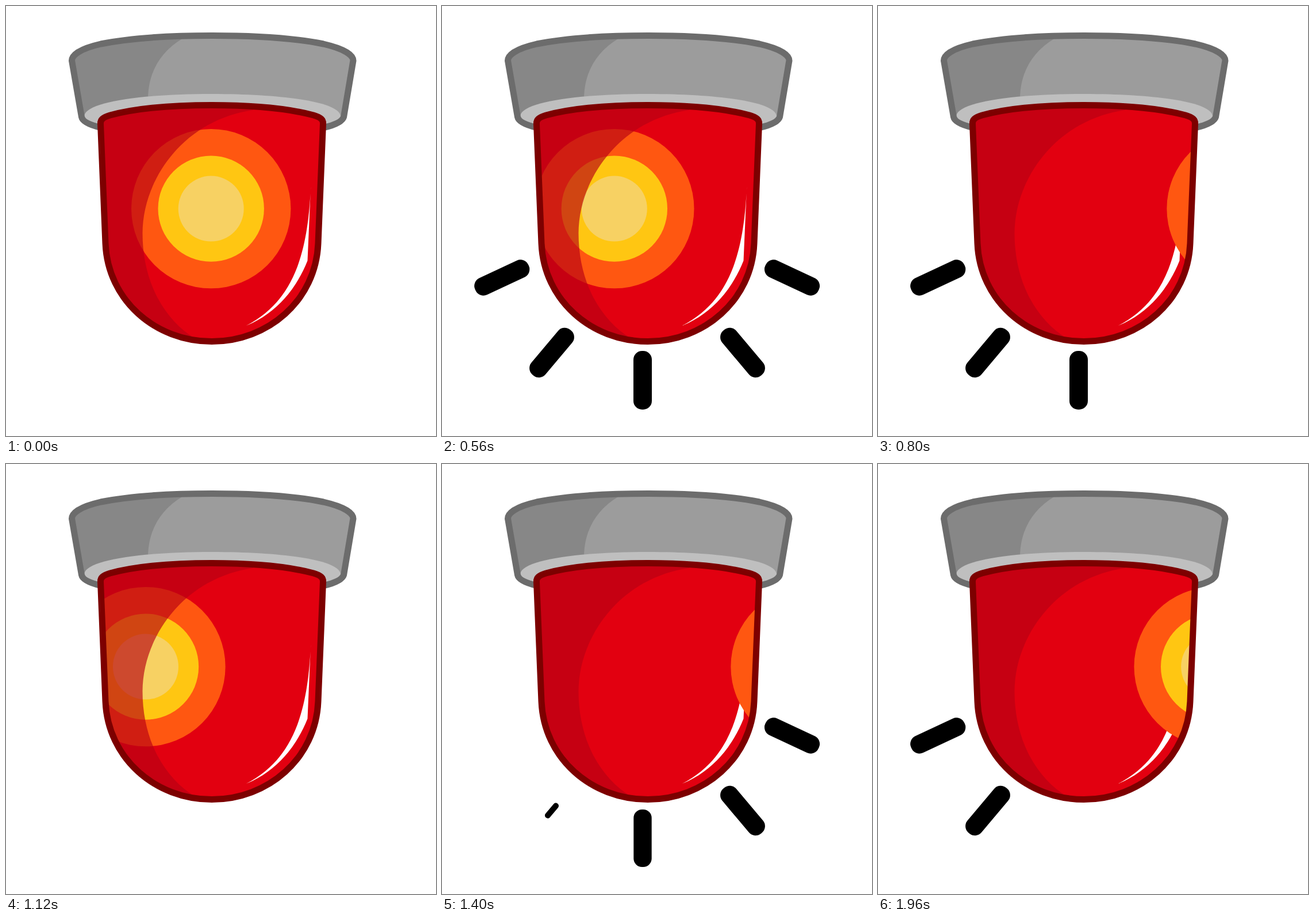
Recreate the animation shown at these times as an HTML page. Size 748 px wide and 748 px high, loop 2000 ms.

```html
<!DOCTYPE html>
<html lang="en">
<head>
<meta charset="utf-8">
<title>Warning lamp</title>
<style>
  html, body { margin: 0; width: 100%; height: 100%; overflow: hidden; background: #fff; }
  svg { display: block; width: 100vw; height: 100vh; }
</style>
</head>
<body>
<svg viewBox="0 0 748 748">
  <defs>
    <path id="mount" d="M114.5 95C114.5 85 130 74 165 66C220 55 290 51.5 358.5 51.5C427 51.5 497 55 552 66C587 74 604 85 604 95L587.5 193C585 201 572 207 553 211.5L165 211.5C146 207 133 201 131.5 193Z"/>
    <path id="bulb" d="M164.5 205C164 198 168 194 181 190C226 178 290 172.5 358 172.5C426 172.5 490 178 535 190C548 194 552 198 551.5 205L543 413C539 512 456 583.5 358 583.5C260 583.5 177 512 173 413Z"/>
    <clipPath id="inMount"><use href="#mount"/></clipPath>
    <clipPath id="inBulb"><use href="#bulb"/></clipPath>
  </defs>

  <g clip-path="url(#inMount)">
    <rect x="100" y="40" width="520" height="180" fill="#9c9c9c"/>
    <path d="M308 56C268 80 248 115 247 160V220H100V40H308Z" fill="#878787"/>
    <path d="M136 191C140 166 240 153 358 153C478 153 578 166 582 191V220H136Z" fill="#bfbfbf"/>
  </g>
  <use href="#mount" fill="none" stroke="#6c6c6c" stroke-width="11" stroke-linejoin="round"/>

  <g clip-path="url(#inBulb)">
    <rect x="150" y="160" width="420" height="440" fill="#e20010"/>
    <path d="M530.5 306L524.5 443C505 492 470 535 418 556C496 515 526 440 530.5 306Z" fill="#fff"/>
    <g id="glow">
      <circle r="138.7" fill="#ff5711"/>
      <circle r="92.2" fill="#ffc612"/>
      <circle r="57" fill="#f7d163"/>
    </g>
    <path d="M430 181C310 198 238 300 237.5 395C237.5 480 275 545 328 578V600H150V160H430Z" fill="#b70013" fill-opacity=".65"/>
  </g>
  <use href="#bulb" fill="none" stroke="#7d0000" stroke-width="11" stroke-linejoin="round"/>
  <g id="rays"></g>
</svg>
<script>
  const STEP = 40, STEPS = 50;
  const GLOW_CYCLE = 15, RAY_CYCLE = 26;
  const GROW = [0, 0.31, 0.91, 0.98, 1];
  // x, y, angle; in the order they light up
  const RAYS = [
    [609, 472.5, -65],
    [523, 603, -40],
    [349, 651, 0],
    [191, 603, 40],
    [104.3, 472.5, 65]
  ];

  const glow = document.getElementById("glow");
  const holder = document.getElementById("rays");

  const rays = RAYS.map(() => {
    const bar = document.createElementNS("http://www.w3.org/2000/svg", "rect");
    const size = { x: -16, y: -51, width: 32, height: 102, rx: 15 };
    for (const key in size) bar.setAttribute(key, size[key]);
    holder.append(bar);
    return bar;
  });

  function rayScale(step, i) {
    const age = step % RAY_CYCLE - 2 - 2 * i;
    if (age <= 0 || age >= 16) return 0;
    return GROW[Math.min(age, GROW.length - 1)];
  }

  function draw(step) {
    // leaves on the right, re-enters on the left
    const shift = (step + 8) % GLOW_CYCLE - 8;
    glow.setAttribute("transform", `translate(${356.7 + 56.87 * shift} 352.6)`);

    rays.forEach((bar, i) => {
      const [x, y, angle] = RAYS[i];
      const scale = rayScale(step, i);
      bar.style.display = scale ? "" : "none";
      bar.setAttribute("transform", `translate(${x} ${y}) rotate(${angle}) scale(${scale})`);
    });
  }

  const start = performance.now();
  function tick() {
    draw(Math.floor((performance.now() - start) / STEP) % STEPS);
    requestAnimationFrame(tick);
  }
  tick();
</script>
</body>
</html>
```
